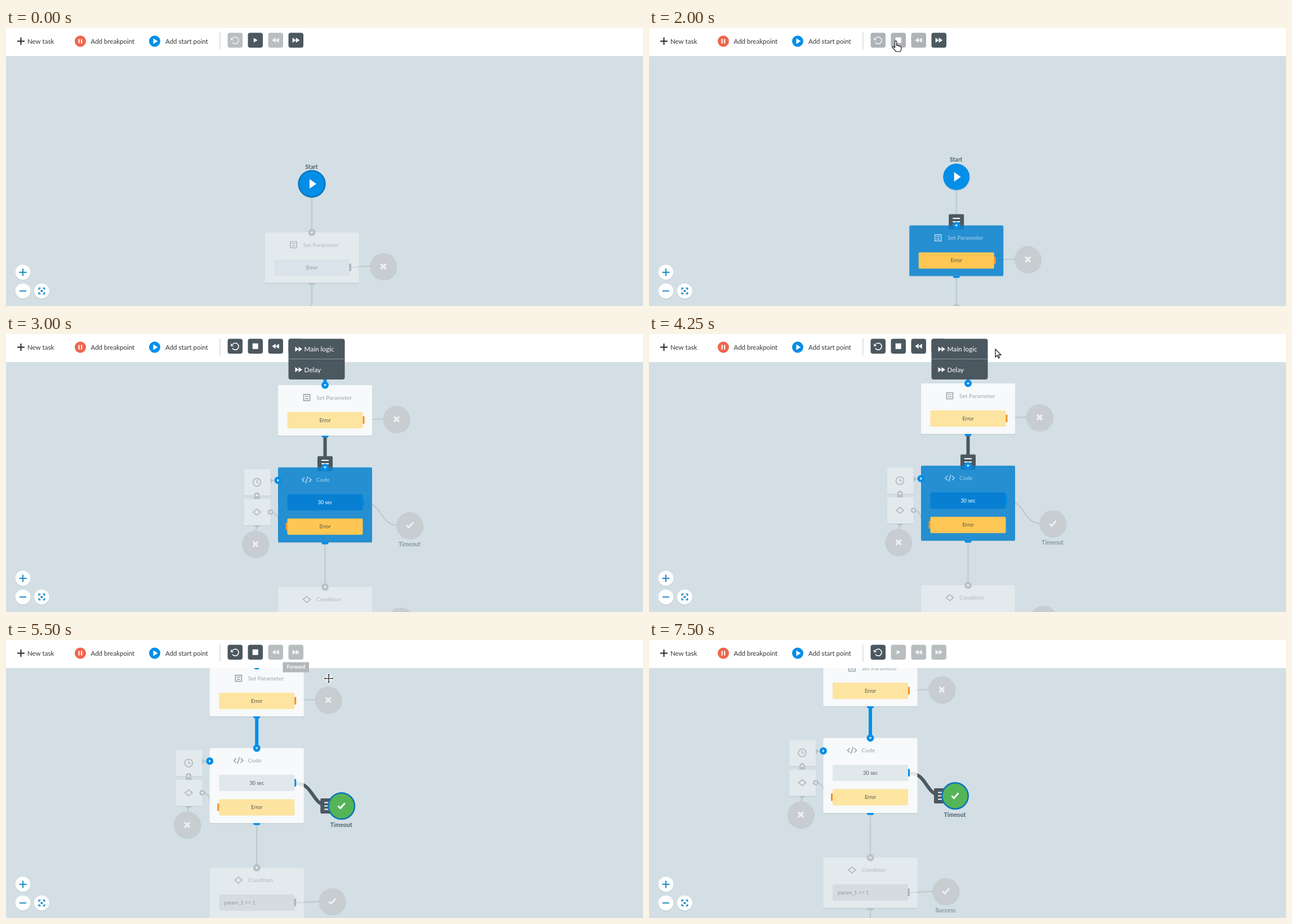
Recreate the animation shown at these times as an HTML page with a canvas. Size 1131 px wide and 495 px high, loop 8000 ms.

```html
<!DOCTYPE html>
<html lang="en">
<head>
<meta charset="utf-8">
<title>Process debugger</title>
<style>
  html, body { margin: 0; width: 100%; height: 100%; overflow: hidden; background: #d3dfe5; }
  canvas { display: block; }
</style>
</head>
<body>
<canvas id="stage" width="1131" height="495"></canvas>
<script>
const ctx = document.getElementById('stage').getContext('2d');
const LOOP = 8000, STEP = 250;
const BLUE = '#048ee8', RIM = '#0a74bd', DARK = '#4c5860', GREY = '#b8bdc0';
const LINE = '#c0cacf', PORT = '#b9c2c6', LABEL = '#5a6c78';
const IDLE = 0, ACTIVE = 1, VISITED = 2;

// ---- drawing helpers ----
function fillRect(x, y, w, h, color, r = 0) {
  ctx.fillStyle = color;
  ctx.beginPath();
  ctx.roundRect(x, y, w, h, r);
  ctx.fill();
}
function disc(x, y, r, color) {
  ctx.fillStyle = color;
  ctx.beginPath();
  ctx.arc(x, y, r, 0, Math.PI * 2);
  ctx.fill();
}
function at(x, y, draw) {
  ctx.save();
  ctx.translate(x, y);
  draw();
  ctx.restore();
}
function fill(d, color) {
  ctx.fillStyle = color;
  ctx.fill(new Path2D(d));
}
function stroke(d, color, width = 2) {
  ctx.strokeStyle = color;
  ctx.lineWidth = width;
  ctx.stroke(new Path2D(d));
}
function text(s, x, y, size, color, align = 'left', weight = 400) {
  ctx.font = `${weight} ${size}px Lato, "Open Sans", sans-serif`;
  ctx.textAlign = align;
  ctx.fillStyle = color;
  ctx.fillText(s, x, y + size * 0.35);
}

const icons = {
  plus: c => stroke('M-6.5 0H6.5M0-6.5V6.5', c),
  minus: c => stroke('M-6 0H6', c),
  play: c => fill('M-3-4L4 0L-3 4Z', c),
  stop: c => fill('M-5-5H5V5H-5Z', c),
  forward: c => fill('M-6-4.5L0 0L-6 4.5ZM0-4.5L6.5 0L0 4.5Z', c),
  rewind: c => fill('M6-4.5L0 0L6 4.5ZM0-4.5L-6.5 0L0 4.5Z', c),
  reset: c => {
    stroke('M-4.6-3A6 6 0 1 1-4.8 3.6', c, 1.6);
    fill('M-7.5-5V0H-2.5Z', c);
  },
  fit: c => {
    stroke('M-5-2V-5H-2M2-5H5V-2M5 2V5H2M-2 5H-5V2', c);
    disc(0, 0, 2, c);
  },
  list: c => stroke('M-5.5-5.5H5.5V5.5H-5.5ZM-3-2H3M-3 2H3', c, 1.7),
  code: c => stroke('M-4-4L-8 0L-4 4M4-4L8 0L4 4M1.8-6L-1.8 6', c, 1.7),
  diamond: c => stroke('M-6.5 0L0-5.5L6.5 0L0 5.5Z', c, 1.7),
  clock: c => {
    stroke('M7 0A7 7 0 1 1-7 0A7 7 0 1 1 7 0', c, 1.7);
    stroke('M0-4V0.5H3.5', c, 1.5);
  },
  cross: c => stroke('M-4.5-4.5L4.5 4.5M4.5-4.5L-4.5 4.5', c, 3.3),
  check: c => stroke('M-6 0L-2 4L6-5', c, 3),
  menu: c => stroke('M-6.5-6H6.5M-6.5 0H6.5M-6.5 6H6.5', c)
};
const icon = (name, x, y, color) => at(x, y, () => icons[name](color));

// ---- timeline ----
const moves = [
  { start: 1880, dx: 23.5, dy: -108 },
  { start: 2548, dx: 0, dy: -168 },
  { start: 5194, dx: -173.5, dy: -60 }
];
const progress = (t, move) => Math.min(1, Math.max(0, (t - move.start) / 500));
const easeInOut = p => p < 0.5 ? 2 * p * p : 1 - 2 * (1 - p) ** 2;

// [time, shape, x, y]; each entry holds until the next
const cursorTrack = [
  [0], [750, 'move', 492.5, 28], [1000, 'hand', 456, 26], [1250, 'hand', 446, 24],
  [1500, 'hand', 436, 28], [1750, 'hand', 436.5, 23], [2250],
  [4250, 'arrow', 615, 27], [4500, 'moveDark', 597, 81], [4750, 'moveDark', 579, 69],
  [5250, 'moveDark', 573, 68.5], [5750, 'move', 792.5, 150], [6000, 'move', 796, 151],
  [6750, 'move', 598, 36], [7000, 'move', 589, -7], [7250]
];

function movePath() {
  const arm = [[-1.2, -5.5], [-3.5, -5.5], [0, -9], [3.5, -5.5], [1.2, -5.5], [1.2, -1.2]];
  const points = [];
  for (let turn = 0; turn < 4; turn++) {
    for (const [x, y] of arm) {
      points.push([[x, y], [-y, x], [-x, -y], [y, -x]][turn]);
    }
  }
  return 'M' + points.map(p => p.join(' ')).join('L') + 'Z';
}
const MOVE = movePath();
const HAND = 'M0 1.5a1.6 1.6 0 0 1 3.2 0V8q3-1 3 1q2.5-1 3 1q2.2-.5 2.2 1.5V15L9.5 19H2L-4 12q-1-2 1.5-2L0 12Z';
const ARROW = 'M0 0V14L3.3 11L5.5 16L7.5 15L5.3 10.2H10Z';

function drawCursor(t) {
  const [, shape, x, y] = cursorTrack.filter(k => k[0] <= t).pop();
  if (!shape) return;
  const path = { hand: HAND, arrow: ARROW }[shape] || MOVE;
  const dark = shape === 'moveDark';
  at(x, y, () => {
    fill(path, dark ? '#111' : '#fff');
    stroke(path, dark ? '#fff' : '#111', 1.2);
  });
}

// ---- diagram ----
const NODE_X = 459.5, NODE_W = 167, AXIS = 543;
const nodeFill = ['rgba(255,255,255,.35)', 'rgba(9,131,206,.86)', 'rgba(255,255,255,.83)'];
const titleColor = ['#b0babf', '#a9d3ee', '#9aa5ab'];
const rowStyle = {
  error: { fill: ['rgba(203,214,224,.4)', '#fec754', '#fde4a0'], ink: ['#8c989f', '#5a5545', '#55564e'], stub: '#f0922b' },
  plain: { fill: ['rgba(198,207,214,.5)', '#0780d4', '#e1e8eb'], ink: ['#8f9a9f', '#fff', '#4f595f'], stub: BLUE }
};

function link(d, state) {
  stroke(d, [LINE, DARK, BLUE][state], state ? 6 : 2.4);
}
function port(x, y, angle, on, r = 6.5) {
  disc(x, y, r, on ? BLUE : PORT);
  at(x, y, () => {
    ctx.rotate(angle);
    fill('M-2.6-1.3H2.6L0 2Z', '#fff');
  });
}
function menuTag(x, y) {
  fillRect(x - 13.5, y - 13.5, 27, 27, DARK, 2);
  icon('menu', x, y, '#fff');
}
function node(y, h, title, iconName, state, rows) {
  fillRect(NODE_X, y + h - 1, NODE_W, 2.5, 'rgba(60,80,90,.1)', 2);
  fillRect(NODE_X, y, NODE_W, h, nodeFill[state], 2);
  icon(iconName, 510.5, y + 22, titleColor[state]);
  text(title, 527.5, y + 22, 10.2, titleColor[state]);
  fill(`M536.5 ${y + h}H549.5L548 ${y + h + 3.5}H538Z`, state ? BLUE : PORT);
  for (const row of rows) {
    const style = rowStyle[row.kind];
    const top = y + row.top;
    fillRect(row.left ? 473 : 609, top + 7.5, 4, 13.5, state ? style.stub : '#b0b7ba', 1);
    fillRect(476, top, 134, 29, style.fill[state], 2);
    const align = row.align || 'center';
    text(row.label, align === 'left' ? 485 : AXIS, top + 14.5, 9.2, style.ink[state], align);
  }
  port(AXIS, y, 0, state);
}
function endpoint(x, y, iconName, label, active) {
  disc(x + 0.5, y + 1.2, 24, 'rgba(60,80,90,.12)');
  disc(x, y, active ? 24.5 : 23.7, active ? RIM : '#c7cdd0');
  if (active) disc(x, y, 22, '#55b458');
  icon(iconName, x, y, active ? '#fff' : '#edf1f2');
  if (label) text(label, x - 0.5, y + 33.5, 10.4, active ? LABEL : '#8d9ca5', 'center', 800);
}
function miniBox(y, iconName) {
  fillRect(399.5, y + 46, 46.5, 2, 'rgba(60,80,90,.1)');
  fillRect(399.5, y, 46.5, 47, nodeFill[IDLE], 1);
  icon(iconName, 422, y + 23, '#b0b9bd');
}

function drawDiagram(t) {
  const stage = t < 2000 ? 0 : t < 2750 ? 1 : t < 5500 ? 2 : 3;
  const stateOf = n => stage < n ? IDLE : stage === n ? ACTIVE : VISITED;
  const linkState = n => stage === n && progress(t, moves[n - 1]) < 0.5 ? IDLE : stateOf(n);
  const set = stateOf(1), code = stateOf(2), ended = stage === 3;
  const setY = 364, codeY = 510.5, condY = 723.5;

  ctx.save();
  for (const move of moves) {
    const k = easeInOut(progress(t, move));
    ctx.translate(move.dx * k, move.dy * k);
  }

  link(`M543 301V${setY}`, linkState(1));
  link(`M543 454V${codeY}`, linkState(2));
  link(`M543 644V${condY}`, IDLE);
  link('M543 813.5V900', IDLE);
  link('M613 426.5Q630 424 647 424', IDLE);
  link('M612 786Q630 785 654 783.5', IDLE);
  link('M612 573C645 573 640 613.5 672 613.5', linkState(3));
  link('M446 590C464 590 458 616 473 616', IDLE);
  link('M446 535L459 533M422 558V566M423 613L419.5 625', IDLE);
  fill('M446 529L451 533.5L446 540ZM416 614H428L424 617H420Z', PORT);
  if (set === ACTIVE) menuTag(AXIS, setY - 6.5);
  if (code === ACTIVE) menuTag(AXIS, codeY - 6.5);

  if (stage === 0) disc(AXIS, 277.5, 24.7, RIM);
  else disc(AXIS + 0.5, 278.7, 23.7, 'rgba(60,80,90,.15)');
  disc(AXIS, 277.5, stage === 0 ? 22.3 : 23.5, BLUE);
  fill('M539 269L551 277.5L539 286Z', '#fff');
  text('Start', 542.5, 247, 10.4, LABEL, 'center', 800);

  node(setY, 90, 'Set Parameter', 'list', set, [{ kind: 'error', label: 'Error', top: 48 }]);
  endpoint(670, 424.5, 'cross');

  miniBox(514, 'clock');
  miniBox(567, 'diamond');
  fillRect(417, 562, 10, 5, PORT);
  port(422, 560, Math.PI, false, 5);
  port(446, 590, Math.PI / 2, false, 5);
  endpoint(419.5, 647, 'cross');

  node(codeY, 133.5, 'Code', 'code', code, [
    { kind: 'plain', label: '30 sec', top: 47.5 },
    { kind: 'error', label: 'Error', top: 91, left: true }
  ]);
  port(NODE_X, 533.5, -Math.PI / 2, code);
  if (ended) menuTag(669.5, 613.5);
  endpoint(693.5, 613.5, 'check', 'Timeout', ended);

  node(condY, 90, 'Condition', 'diamond', IDLE, [
    { kind: 'plain', label: 'param_1 == 1', top: 47.5, align: 'left' }
  ]);
  endpoint(677, 783.5, 'check', 'Success', false);
  ctx.restore();
}

// ---- fixed interface ----
function button(index, iconName, enabled, color) {
  const x = 393.5 + index * 36;
  fillRect(x, 8.5, 26.5, 26.5, color || (enabled ? DARK : GREY), 4);
  icon(iconName, x + 13.2, 21.7, enabled ? '#fff' : '#f1f3f4');
}

function drawToolbar(t) {
  fillRect(0, 0, 1131, 50, '#fff');
  icon('plus', 26.5, 23.5, '#222');
  disc(132, 23.5, 10, '#f1654c');
  fillRect(128.5, 19.5, 2.2, 8, '#fff');
  fillRect(133, 19.5, 2.2, 8, '#fff');
  disc(264, 23.5, 10, BLUE);
  fill('M261.5 18.5L269.5 23.5L261.5 28.5Z', '#fff');
  text('New task', 38, 23.5, 11.5, '#333');
  text('Add breakpoint', 150.5, 23.5, 11.5, '#333');
  text('Add start point', 283, 23.5, 11.5, '#333');
  fillRect(379, 8, 1.6, 30.5, '#d9dcdf');

  const running = t >= 2250, busy = t >= 2000 && !running;
  const stepping = running && t < 5500;
  const stopShown = t >= 2000 && t < 6250;
  const dimmed = busy ? '#afb3b7' : null;
  button(0, 'reset', running, dimmed);
  button(1, stopShown ? 'stop' : 'play', t < 6250, dimmed || (t >= 1250 && t < 2000 ? '#3d464c' : null));
  button(2, 'rewind', stepping, dimmed);
  button(3, 'forward', t < 5500);

  if (t >= 2750 && t < 5500) drawForwardMenu(t >= 4750);
  if (t >= 5500 && t < 6000) {
    fillRect(491.5, 39.5, 46.5, 18, '#b3b7b9');
    text('Forward', 514.8, 48, 8.9, '#fff', 'center', 700);
  }
}

function drawForwardMenu(hoverDelay) {
  fillRect(501.5, 8.5, 100, 72.5, DARK, 4);
  if (hoverDelay) fillRect(501.5, 45, 100, 36, '#353b3f', [0, 0, 4, 4]);
  fillRect(501.5, 44, 100, 1, '#8c9499');
  ['Main logic', 'Delay'].forEach((label, i) => {
    icon('forward', 519.5, 27 + i * 36.5, '#fff');
    text(label, 529.5, 27 + i * 36.5, 11.8, '#fff');
  });
}

function drawZoomControls() {
  for (const [name, x, y] of [['plus', 30, 435], ['minus', 30, 468.3], ['fit', 63.4, 468.3]]) {
    disc(x, y + 1, 13.6, 'rgba(60,80,90,.15)');
    disc(x, y, 13.4, '#fff');
    icon(name, x, y, '#1f8ac6');
  }
}

function frame(now) {
  const t = Math.floor(now % LOOP / STEP) * STEP;
  fillRect(0, 0, 1131, 495, '#d3dfe5');
  drawDiagram(t);
  drawZoomControls();
  drawToolbar(t);
  drawCursor(t);
  requestAnimationFrame(() => frame(performance.now()));
}
frame(performance.now());
</script>
</body>
</html>
```
